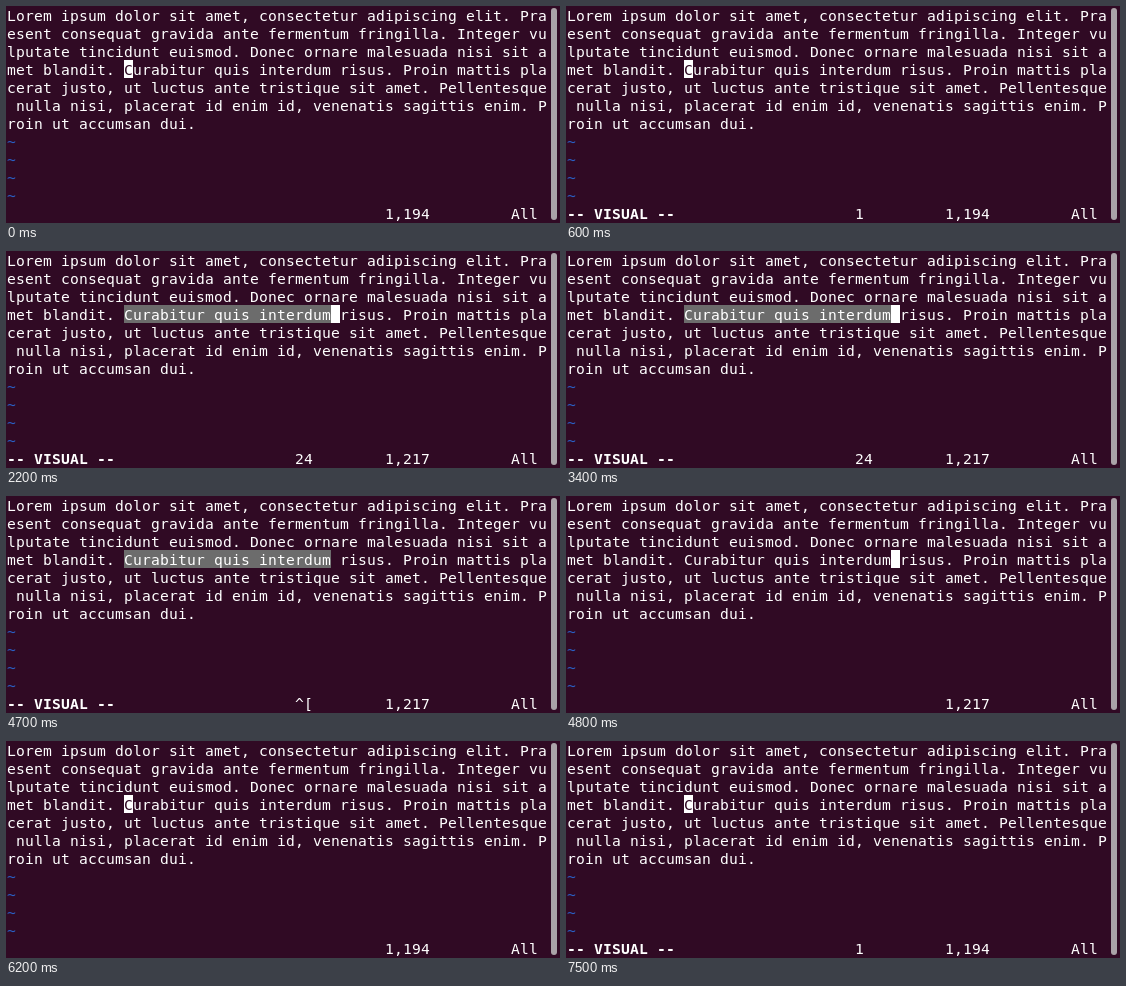
An HTML page with a canvas for the animation above (8 s loop, 554x217 px).

```html
<!DOCTYPE html>
<html>
<head>
<meta charset="utf-8">
<style>
html, body { margin: 0; width: 100%; height: 100%; overflow: hidden; background: #300a24; }
canvas { display: block; }
</style>
</head>
<body>
<canvas width="554" height="217"></canvas>
<script>
const ctx = document.querySelector('canvas').getContext('2d');
const BG = '#300a24', CELL_W = 9, CELL_H = 18, LOOP = 8000;
const COLS = 60, LINE = 3, HOME = 13, CMD_COL = 32, RULER_COL = 42;
const text = 'Lorem ipsum dolor sit amet, consectetur adipiscing elit. ' +
  'Praesent consequat gravida ante fermentum fringilla. Integer vulputate tincidunt euismod. ' +
  'Donec ornare malesuada nisi sit amet blandit. Curabitur quis interdum risus. ' +
  'Proin mattis placerat justo, ut luctus ante tristique sit amet. Pellentesque nulla nisi, ' +
  'placerat id enim id, venenatis sagittis enim. Proin ut accumsan dui.';
const rows = text.match(new RegExp(`.{1,${COLS}}`, 'g'));

// Each entry: start time and the editor fields that change then.
const steps = [
  [0, { col: 13, on: true, visual: false, cmd: '' }],
  [400, { on: false }],
  [500, { visual: true, cmd: '1' }],
  [600, { on: true }],
  [1100, { on: false }],
  [1200, { on: true, cmd: '3' }],
  [1800, { cmd: '3a' }],
  [2200, { col: 36, cmd: '24' }],
  [2800, { on: false }],
  [3400, { on: true }],
  [4000, { on: false }],
  [4600, { on: true }],
  [4700, { on: false, cmd: '^[' }],
  [4800, { on: true, visual: false, cmd: '' }],
  [5300, { on: false }],
  [5500, { on: true }],
  [5600, { col: 28 }],
  [5900, { col: 23 }],
  [6200, { col: 13 }],
  [6800, { on: false }],
  [7400, { on: true }],
  [7500, { visual: true, cmd: '1' }]
];

function block(col, row, count, color) {
  ctx.fillStyle = color;
  ctx.fillRect(1 + col * CELL_W, row * CELL_H, count * CELL_W, CELL_H);
}

function print(str, col, row, color = '#fff', weight = '') {
  ctx.font = `${weight} 14.667px "DejaVu Sans Mono", monospace`;
  ctx.fillStyle = color;
  [...str].forEach((ch, i) => ctx.fillText(ch, 1 + (col + i) * CELL_W, row * CELL_H + 15));
}

function draw(time) {
  const state = {};
  for (const [start, change] of steps) if (start <= time) Object.assign(state, change);
  const { col, on, visual, cmd } = state;

  ctx.fillStyle = BG;
  ctx.fillRect(0, 0, 554, 217);
  if (visual) block(HOME, LINE, col - HOME, '#6c6c6c');
  rows.forEach((row, i) => print(row, 0, i));
  for (let row = rows.length; row < 11; row++) print('~', 0, row, '#2a5fc4');
  if (on) {
    block(col, LINE, 1, '#fff');
    print(rows[LINE][col], col, LINE, BG);
  }

  if (visual) print('-- VISUAL --', 0, 11, '#fff', 'bold');
  print(cmd, CMD_COL, 11);
  print(`1,${LINE * COLS + col + 1}`, RULER_COL, 11);
  print('All', 56, 11);

  ctx.fillStyle = '#aaa3a8';
  ctx.beginPath();
  ctx.roundRect(545, 2, 6, 212, 3);
  ctx.fill();
}

function tick() {
  draw(performance.now() % LOOP);
  requestAnimationFrame(tick);
}
tick();
</script>
</body>
</html>
```
